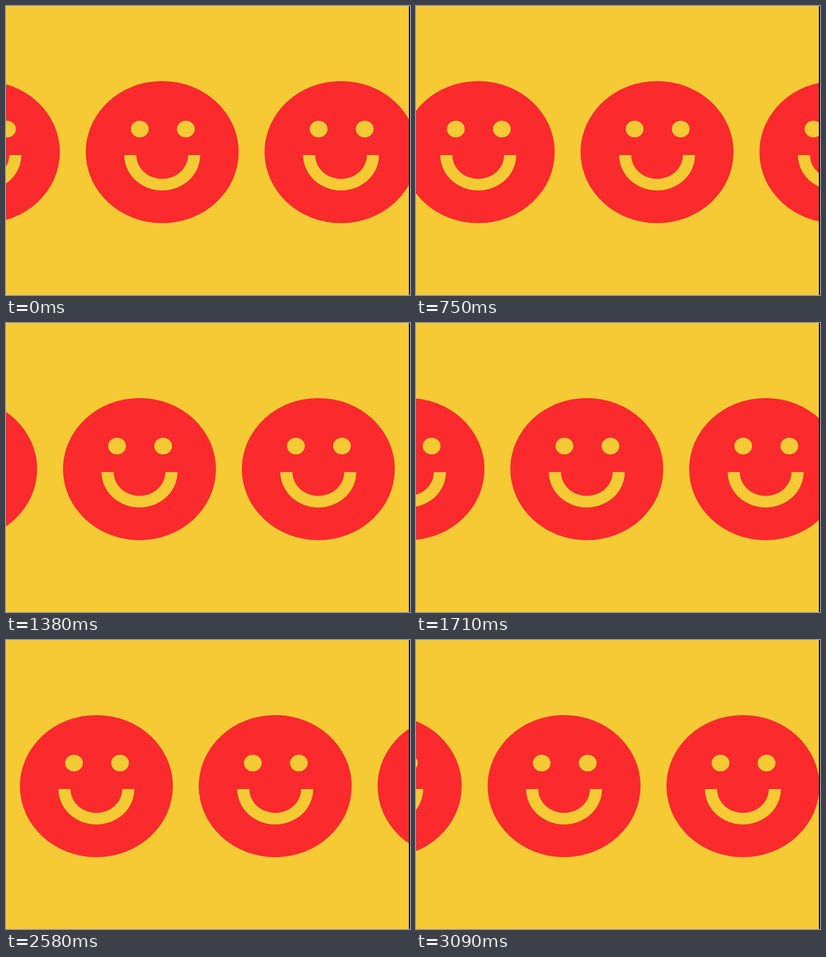
Animation of 750x539 px, one loop 3.12 s. Source, as an HTML page:

```html
<!DOCTYPE html>
<html lang="en">
<head>
<meta charset="utf-8">
<title>Rolling smiles</title>
<style>
  html, body { margin: 0; width: 100%; height: 100%; overflow: hidden; background: #f6ca35; }
  svg { display: block; }
</style>
</head>
<body>
<svg width="750" height="539" viewBox="0 0 750 539">
  <defs>
    <g id="face" fill="#f6ca35">
      <ellipse cy="272.5" rx="142" ry="132.5" fill="#fb2b2d"/>
      <ellipse cx="-41.6" cy="229.5" rx="16.5" ry="15.5"/>
      <ellipse cx="43.9" cy="229.5" rx="16.5" ry="15.5"/>
      <path d="M-70.5 278A70.5 66 0 0 0 70.5 278H48A48 44.5 0 0 1 -48 278Z"/>
    </g>
  </defs>
  <g id="row">
    <use href="#face" x="-332"/>
    <use href="#face"/>
    <use href="#face" x="332"/>
    <use href="#face" x="664"/>
  </g>
  <rect x="748" width="2" height="539"/>
</svg>
<script>
  const LOOP = 3120, STEP = 30, GAP = 332, START = 290, SPEED = 0.21;
  const row = document.getElementById('row');

  function draw() {
    const t = Math.floor(performance.now() % LOOP / STEP) * STEP;
    const x = (START + SPEED * t) % GAP;
    row.setAttribute('transform', `translate(${x.toFixed(2)} 0)`);
    requestAnimationFrame(draw);
  }
  draw();
</script>
</body>
</html>
```
